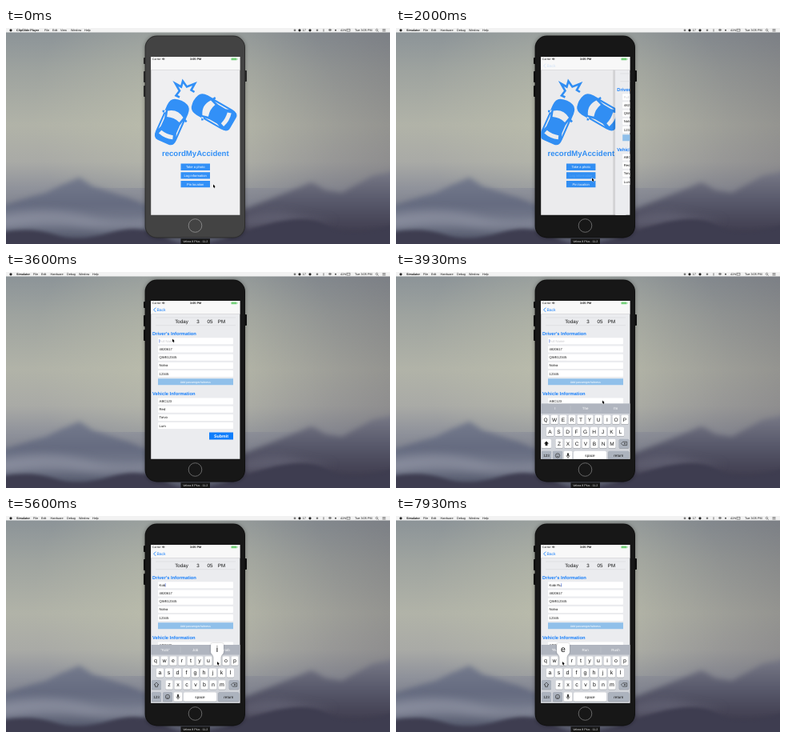
Recreate the animation shown at these times as an HTML page with a canvas. Size 480 by 270 pixels, loop 8000 ms.

```html
<!DOCTYPE html>
<html lang="en">
<head>
<meta charset="utf-8">
<title>Accident form demo</title>
<style>
html, body { margin: 0; width: 100%; height: 100%; overflow: hidden; background: #777a80; }
canvas { display: block; width: 480px; height: 270px; }
</style>
</head>
<body>
<canvas id="stage" width="480" height="270"></canvas>
<script>
const c = document.getElementById('stage').getContext('2d');
const LOOP = 8000, BLUE = '#3290f7', PAGE = '#efeff1';
const FONT = '"Liberation Sans", Arial, sans-serif';
c.textRendering = 'geometricPrecision';

const clamp = v => Math.max(0, Math.min(1, v));
const easeOut = v => 1 - (1 - clamp(v)) ** 3;
const smooth = v => v * v * (3 - 2 * v);

function box(x, y, w, h, fill, r = 0) {
  c.fillStyle = fill;
  c.beginPath();
  c.roundRect(x, y, w, h, r);
  c.fill();
}
function text(s, x, y, size, fill = '#111', align = 'left', weight = '') {
  c.font = `${weight} ${size}px ${FONT}`;
  c.textAlign = align;
  c.textBaseline = 'alphabetic';
  c.fillStyle = fill;
  c.fillText(s, x, y);
}
function label(s, x, y, size, fill, weight) {
  text(s, x, y + size * 0.36, size, fill, 'center', weight);
}
function dot(x, y, r, fill) {
  c.fillStyle = fill;
  c.beginPath();
  c.arc(x, y, r, 0, 7);
  c.fill();
}
function line(points, color, width) {
  c.strokeStyle = color;
  c.lineWidth = width;
  c.beginPath();
  points.forEach(p => c.lineTo(...p));
  c.stroke();
}
function shape(path, fill) {
  c.fillStyle = fill;
  c.fill(new Path2D(path));
}
function shade(g, stops) {
  stops.forEach(([at, color]) => g.addColorStop(at, color));
  return g;
}
const down = (y, h, stops) => shade(c.createLinearGradient(0, y, 0, y + h), stops);
const across = (x, w, stops) => shade(c.createLinearGradient(x, 0, x + w, 0), stops);

function wifi(x, y, r) {
  c.strokeStyle = '#222';
  c.lineWidth = 0.6;
  for (const k of [0.4, 0.7, 1]) {
    c.beginPath();
    c.arc(x, y, r * k, -2.4, -0.75);
    c.stroke();
  }
}

// Misty mountains behind the phone
function backdrop() {
  box(0, 0, 480, 270, down(0, 270, [[0, '#8a9297'], [0.2, '#9ea39f'], [0.45, '#b1b3a8'],
    [0.62, '#a9aaa6'], [0.75, '#8e919a'], [1, '#5f6375']]));
  box(0, 0, 480, 200, shade(c.createRadialGradient(225, 105, 0, 225, 105, 190),
    [[0, 'rgba(198,200,176,.55)'], [0.5, 'rgba(192,194,174,.3)'], [1, 'rgba(190,192,174,0)']]));
  box(0, 0, 480, 270, across(260, 220, [[0, 'rgba(92,88,98,0)'], [1, 'rgba(92,88,98,.34)']]));
  c.save();
  c.filter = 'blur(3px)';
  shape('M-10 224 L28 212 50 206 70 196 92 187 108 198 130 205 155 213 190 228 V280 H-10Z',
    down(187, 75, [[0, '#747a8c'], [0.45, '#656b80'], [0.75, '#777c8e'], [1, '#555a6d']]));
  shape('M280 234 L310 222 335 212 360 202 382 193 400 203 420 206 440 195 458 185 490 178 V280 H280Z',
    down(182, 80, [[0, '#757684'], [0.4, '#5a5b6d'], [0.7, '#4a495b'], [1, '#3c394a']]));
  c.filter = 'blur(6px)';
  shape('M-10 236 Q50 222 100 236 T190 238 V248 Q130 254 90 246 T-10 252Z', 'rgba(150,154,168,.6)');
  shape('M295 236 Q330 224 365 234 T420 238 Q360 252 295 250Z', 'rgba(125,126,142,.4)');
  c.filter = 'blur(2px)';
  shape('M-10 256 Q30 248 60 258 T130 256 T200 262 T300 254 T400 246 T490 244 V280 H-10Z', '#3e3d50');
  c.restore();
}

function menuBar(active) {
  box(0, 0, 480, 5.6, '#f2f2f2');
  dot(6, 2.8, 1.6, '#222');
  text(active ? 'Simulator' : 'ClipGlide Player', 13, 4.1, 3.7, '#111', 'left', 'bold');
  const items = active
    ? [['File', 34], ['Edit', 44], ['Hardware', 55.5], ['Debug', 76], ['Window', 91], ['Help', 108]]
    : [['File', 48], ['Edit', 58], ['View', 68], ['Window', 81], ['Help', 98]];
  items.forEach(([s, x]) => text(s, x, 4.1, 3.7));
  dot(361, 2.8, 1.4, '#777');
  dot(367, 2.8, 1.6, '#222');
  text('17', 370.8, 4.1, 3.7);
  dot(380, 2.8, 1.6, '#222');
  dot(389, 2.8, 1.3, '#777');
  line([[397, 1.3], [397, 4.5]], '#444', 0.7);
  wifi(405, 4.4, 2.8);
  dot(412, 2.8, 1, '#444');
  text('41%', 418, 4.1, 3.7);
  c.strokeStyle = '#333';
  c.lineWidth = 0.5;
  c.strokeRect(426, 1.7, 4, 2.3);
  text('Tue 3:05 PM', 436, 4.1, 3.8);
  c.beginPath();
  c.arc(463.5, 2.5, 1.2, 0, 7);
  c.stroke();
  line([[464.4, 3.4], [465.6, 4.6]], '#333', 0.6);
  for (const y of [1.6, 2.8, 4]) line([[470.5, y], [474.5, y]], '#333', 0.5);
}

function phone(active) {
  const body = active ? '#171717' : '#434343', side = active ? '#101010' : '#2c2c2c';
  for (const [y, h] of [[37, 8], [54, 14], [72, 14]]) box(172, y, 3, h, side, 0.8);
  box(298, 53, 3, 14, side, 0.8);
  c.save();
  c.shadowColor = 'rgba(0,0,0,.35)';
  c.shadowBlur = 5;
  box(173.6, 9.5, 125.4, 253, side, 15);
  c.restore();
  box(174.6, 10.5, 123.4, 251, body, 14);
  c.strokeStyle = active ? '#707070' : '#8c8c8c';
  c.lineWidth = 0.9;
  c.beginPath();
  c.arc(236.5, 247, 8.3, 0, 7);
  c.stroke();
  box(218.5, 263.2, 36.5, 6.8, '#161616');
  label('Velora 8 Plus - 11.2', 236.7, 267, 3.6, '#eee');
}

function car(x, y, angle) {
  c.save();
  c.translate(x, y);
  c.rotate(angle * Math.PI / 180);
  c.scale(1.06, 1.06);
  shape('M-8 -25 Q0 -28 8 -25 Q13 -23 13.4 -15 V18 Q13.4 27 7 27 H-7 Q-13.4 27 -13.4 18 V-15 Q-13 -23 -8 -25Z' +
    'M-12 -9 L-16 -7 -15 -5 -12 -6Z M12 -9 L16 -7 15 -5 12 -6Z', BLUE);
  shape('M-10 -9 Q0 -16 10 -9 L8 -2 Q0 -5 -8 -2Z M-7.5 15 Q0 17 7.5 15 L9 19.5 Q0 22.5 -9 19.5Z' +
    'M-11.4 -5 L-10 1 V11 L-11.4 15Z M11.4 -5 L10 1 V11 L11.4 15Z', PAGE);
  c.restore();
}

function home(pressed) {
  box(181, 36, 112, 198, PAGE);
  car(208, 116.5, 24);
  car(259, 104.5, -60);
  c.lineJoin = 'miter';
  line([[217, 86.5], [212.5, 84.5], [217, 78.5], [211.8, 69.5], [219, 73.5], [221, 66.5], [226, 73.5],
    [236, 69.5], [231.5, 77.5], [235.5, 80]], BLUE, 2.6);
  text('recordMyAccident', 236.8, 160, 9.6, BLUE, 'center', 'bold');
  ['Take a photo', 'Log information', 'Pin location'].forEach((s, i) => {
    const y = 169.5 + i * 10.7;
    box(218.5, y, 36.5, 8.4, BLUE);
    label(s, 236.7, y + 4.2, 4.1, pressed && i === 1 ? 'rgba(255,255,255,.2)' : '#fff');
  });
}

function field(y, s, color) {
  box(190, y - 4, 94, 8, '#fff', 0.8);
  text(s, 191.6, y + 1.5, 4.2, color);
}

function form(typed, focused) {
  box(181, 36, 112, 198, '#ebecef');
  for (const y of [57, 66.7]) line([[187, y], [287, y]], '#d2d3d6', 0.5);
  [['Today', 219.5], ['3', 240], ['05', 255], ['PM', 269.5]].forEach(([s, x]) => label(s, x, 62, 6.2, '#111'));
  text("Driver's Information", 183, 78.6, 5.8, '#167efb', 'left', 'bold');
  field(86.2, typed || 'Full Name', typed ? '#111' : '#c7c7cc');
  if (focused) {
    const x = 191.8 + c.measureText(typed).width;
    line([[x, 84], [x, 88.6]], '#4a6fe0', 0.6);
  }
  ['4820617', 'QWE12345', 'Nolva', '12345'].forEach((s, i) => field(96.5 + i * 10.2, s));
  box(190, 133.2, 94, 8, '#90c0ea');
  label('Add passenger/witness', 236.7, 137.2, 3.7, '#fff');
  text('Vehicle Information', 183, 154, 5.8, '#167efb', 'left', 'bold');
  ['ABC123', 'Red', 'Torvo', 'Lum'].forEach((s, i) => field(161.5 + i * 10.2, s));
  box(254, 200.6, 30, 9, '#0f7dfb');
  label('Submit', 269, 205.1, 5.3, '#fff', 'bold');
}

function topBars(back) {
  box(181, 36, 112, 16.5, '#f8f8f8');
  line([[181, 52.5], [293, 52.5]], '#c8c8cb', 0.5);
  text('Carrier', 183, 40.2, 3.5);
  wifi(196.7, 40.4, 2.4);
  text('3:05 PM', 237, 40.2, 3.7, '#111', 'center', 'bold');
  box(281.5, 37.5, 7, 2.8, '#74d079', 0.6);
  box(289, 38.3, 0.6, 1.2, '#74d079');
  c.globalAlpha = back;
  line([[187.2, 44.6], [184.6, 47.2], [187.2, 49.8]], '#167efb', 0.9);
  text('Back', 188.5, 49, 5, '#167efb');
  c.globalAlpha = 1;
}

const rows = [['qwertyuiop', 187, 181], ['asdfghjkl', 192.5, 196], ['zxcvbnm', 204, 211]];
const presses = [[4470, 4600, 'K'], [4900, 5000, 'o'], [5200, 5330, 'b'], [5600, 5730, 'i'],
  [6060, 6180, ' '], [6480, 6600, 'R'], [7000, 7130, 'u'], [7870, 8100, 'e']];
const hints = { '': ['I', 'The', "I'm"], 'K': ['“K”', 'Keep', 'Kind'], 'Ko': ['“Ko”', 'Know', 'Known'],
  'Kob': ['“Kob”', 'Job', 'Knob'], 'Kobi': ['“Kobi”', 'Kind', 'Robin'], 'Kobi ': ['We', 'Not', 'Something'],
  'Kobi R': ['“R”', 'Right', 'Really'], 'Kobi Ru': ['“Ru”', 'Run', 'Rush'] };

function key(x, y, w, fill = '#fff') {
  box(x - w / 2, y - 5.4, w, 11.6, '#8b8e94', 1.5);
  box(x - w / 2, y - 5.8, w, 11.5, fill, 1.5);
}

function keyboard(typed, held) {
  const caps = typed === '' || typed.endsWith(' '), grey = '#acb3be';
  box(181, 161, 112, 73, '#d1d4da');
  box(181, 161, 112, 12.6, '#b0b5bf');
  for (const x of [218, 256]) line([[x, 163.5], [x, 171]], '#c3c7cf', 0.5);
  hints[typed].forEach((s, i) => label(s, 199 + i * 37.7, 167, 4.5, '#fff'));

  let pop;
  for (const [letters, x0, y] of rows) {
    [...letters].forEach((ch, i) => {
      const x = x0 + i * 11, s = caps ? ch.toUpperCase() : ch;
      key(x, y, 9.2);
      label(s, x, y - (caps ? 0 : 0.6), caps ? 6.5 : 7, '#111');
      if (held && ch === held.toLowerCase()) pop = [s, x, y];
    });
  }
  c.strokeStyle = '#222';
  c.lineWidth = 0.6;
  key(188, 211, 12, caps ? '#fff' : grey);
  const arrow = new Path2D('M188 208 L191 211 H189.4 V213.6 H186.6 V211 H185Z');
  c.fillStyle = '#111';
  caps ? c.fill(arrow) : c.stroke(arrow);
  key(285, 211, 12.5, grey);
  c.stroke(new Path2D('M281.4 211 L283.6 208.8 H288.6 V213.2 H283.6Z M284.8 210 L287 212 M287 210 L284.8 212'));

  key(188, 226, 12, grey);
  label('123', 188, 226, 4.6, '#111');
  key(202, 226, 12, grey);
  c.stroke(new Path2D('M204.7 226 a2.7 2.7 0 1 1 -5.4 0 a2.7 2.7 0 1 1 5.4 0 M200.6 226.6 Q202 228.6 203.4 226.6'));
  dot(201.1, 225.2, 0.35, '#222');
  dot(202.9, 225.2, 0.35, '#222');
  key(215, 226, 11);
  box(214.1, 222.8, 1.8, 4, '#222', 0.9);
  c.stroke(new Path2D('M213 225.5 Q213 228 215 228 T217 225.5 M215 228 V229.4'));
  key(242.5, 226, 41, held === ' ' ? grey : '#fff');
  label('space', 242.5, 226, 4.6, '#111');
  key(278.3, 226, 26, grey);
  label('return', 278.3, 226, 4.6, '#111');

  if (pop) {
    const [s, x, y] = pop;
    c.save();
    c.translate(x, y);
    c.shadowColor = 'rgba(0,0,0,.35)';
    c.shadowBlur = 2;
    shape('M-6 -22 H6 Q8 -22 8 -20 V-11 Q8 -9 6 -7.5 Q4.6 -6 4.6 -4 V5.7 H-4.6 V-4 Q-4.6 -6 -6 -7.5 Q-8 -9 -8 -11 V-20 Q-8 -22 -6 -22Z', '#fff');
    c.restore();
    label(s, x, y - 14.5, 10.5, '#111');
  }
}

const route = [[0, 259, 195.5], [600, 259, 195.5], [920, 240, 179], [1270, 245, 187.5], [2470, 245, 187.5],
  [3000, 208, 83.5], [3640, 208, 83.5], [3930, 258, 160.5], [4350, 269, 197], [4650, 269, 197],
  [4860, 275, 181], [5010, 275, 181], [5180, 248, 210], [5340, 248, 210], [5580, 264, 182],
  [5740, 264, 182], [6040, 243, 222], [6180, 243, 222], [6330, 220, 205], [6460, 220, 183],
  [6620, 220, 183], [6970, 253, 183], [7150, 253, 183], [7730, 208, 182], [8000, 208, 182]];

function pointer(t) {
  const i = route.findIndex(p => p[0] > t), [t0, x0, y0] = route[i - 1], [t1, x1, y1] = route[i];
  const k = smooth((t - t0) / (t1 - t0));
  c.save();
  c.translate(x0 + (x1 - x0) * k, y0 + (y1 - y0) * k);
  const p = new Path2D('M0 0 V4 L0.9 3.2 1.6 4.7 2.3 4.4 1.6 2.9 2.8 2.8Z');
  c.strokeStyle = '#fff';
  c.lineWidth = 0.7;
  c.stroke(p);
  c.fillStyle = '#000';
  c.fill(p);
  c.restore();
}

function draw(t) {
  const active = t >= 1600, push = easeOut((t - 1960) / 700);
  const typed = presses.filter(p => p[1] <= t).map(p => p[2]).join('');
  const press = presses.find(p => p[0] <= t && t < p[1]);
  const rise = easeOut((t - 3650) / 440);

  backdrop();
  menuBar(active);
  phone(active);

  c.save();
  c.beginPath();
  c.rect(181.2, 36, 111.2, 197.7);
  c.clip();
  if (push < 1) {
    c.save();
    c.translate(-33.5 * push, 0);
    home(t >= 1700);
    c.restore();
  }
  if (push > 0) {
    if (push < 1) box(181, 36, 112, 198, `rgba(0,0,0,${0.1 * push})`);
    c.save();
    c.translate(111.7 * (1 - push), 0);
    if (push < 1) box(178, 36, 3, 198, 'rgba(0,0,0,.1)');
    form(typed, t >= 3600);
    c.restore();
  }
  topBars(push);
  if (rise > 0) {
    c.save();
    c.translate(0, 73 * (1 - rise));
    keyboard(typed, press && press[2]);
    c.restore();
  }
  c.restore();
  pointer(t);
}

function tick() {
  draw(performance.now() % LOOP);
  requestAnimationFrame(tick);
}
tick();
</script>
</body>
</html>
```
